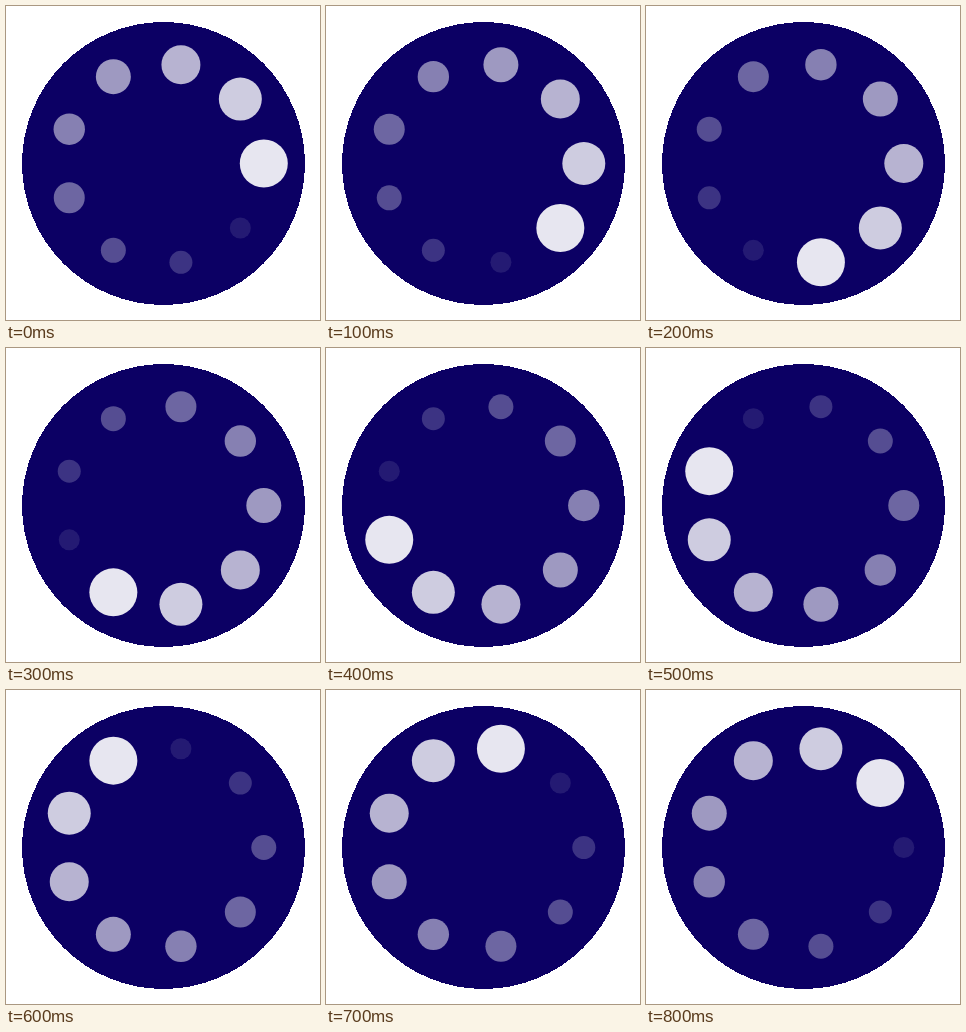
Animation, 314 px wide and 314 px high, one loop 0.9 s. Source, as an HTML page:

```html
<!DOCTYPE html>
<html lang="en">
<head>
<meta charset="utf-8">
<title>Loading spinner</title>
<style>
  html, body { margin: 0; width: 100%; height: 100%; overflow: hidden; background: #fff; }
  svg { display: block; width: 100%; height: 100%; }
</style>
</head>
<body>
<svg id="stage" viewBox="0 0 314 314">
  <circle cx="157.5" cy="157.5" r="141.5" fill="#0c0064" shape-rendering="crispEdges"/>
</svg>
<script>
  const CENTER = 157.5;
  const ORBIT = 100.3;
  const STEP_MS = 100;
  const RADII = [24, 21.5, 19.5, 17.5, 15.7, 15.5, 12.5, 11.5, 10.5];
  const COUNT = RADII.length;

  const stage = document.getElementById('stage');

  // The leading dot is the largest and brightest; the rest trail behind it.
  const dots = RADII.map((r, rank) => {
    const dot = document.createElementNS(stage.namespaceURI, 'circle');
    dot.setAttribute('r', r);
    dot.setAttribute('fill', '#fff');
    dot.setAttribute('fill-opacity', (COUNT - rank) / 10);
    return stage.appendChild(dot);
  });

  function render(ms) {
    const step = Math.floor(ms / STEP_MS) % COUNT;
    dots.forEach((dot, rank) => {
      const angle = (step - rank) * 2 * Math.PI / COUNT;
      dot.setAttribute('cx', (CENTER + ORBIT * Math.cos(angle)).toFixed(2));
      dot.setAttribute('cy', (CENTER + ORBIT * Math.sin(angle)).toFixed(2));
    });
  }

  const start = performance.now();
  function tick() {
    render(performance.now() - start);
    requestAnimationFrame(tick);
  }
  render(0);
  requestAnimationFrame(tick);
</script>
</body>
</html>
```
